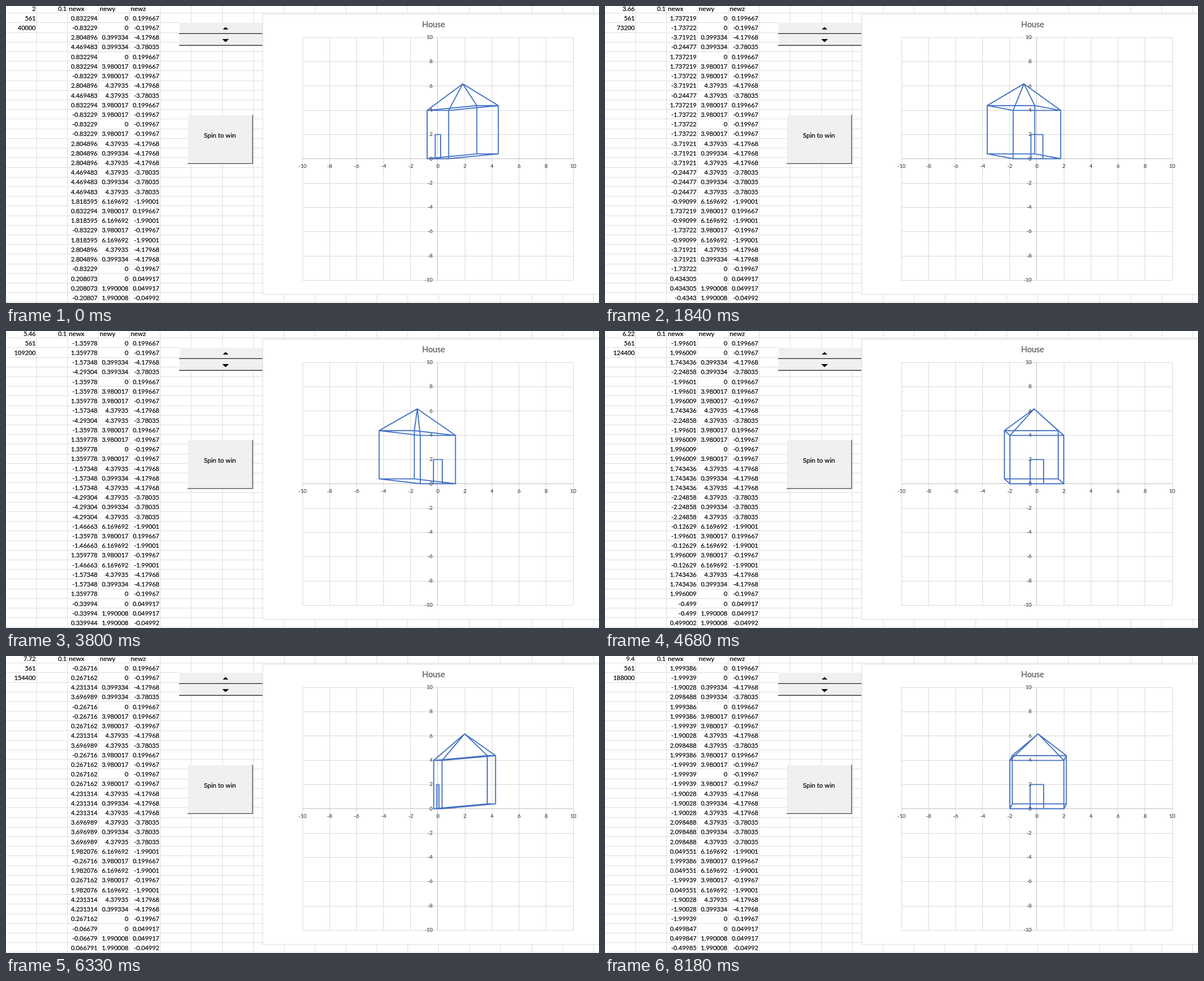
Animation of 1056x530 px, one loop 8210 ms. Source, as an HTML page with a canvas:

```html
<!DOCTYPE html>
<html lang="en">
<head>
<meta charset="utf-8">
<title>House</title>
<style>
  html, body { margin: 0; width: 100%; height: 100%; overflow: hidden; background: #fff; }
  canvas { display: block; }
</style>
</head>
<body>
<canvas id="stage" width="1056" height="530"></canvas>
<script>
const ctx = document.getElementById('stage').getContext('2d');
const W = 1056, H = 530, LOOP = 8210;
const ROW = 17.21, TILT = 0.1;

// [time in ms, angle in hundredths, optional number of steps to the next entry]
const timeline = [
  [0, 200], [790, 272, 1], [860, 278], [1060, 296], [2640, 444], [3800, 546],
  [5570, 706, 1], [5640, 712], [7030, 836], [8180, 940, 1], [LOOP, 942]
];

// House corners: floor a-d, ceiling e-h, roof tip t, door p-s
const corners = {
  a: [-2, 0, 0], b: [2, 0, 0], c: [2, 0, 4], d: [-2, 0, 4],
  e: [-2, 4, 0], f: [2, 4, 0], g: [2, 4, 4], h: [-2, 4, 4],
  t: [0, 6, 2],
  p: [-.5, 0, 0], q: [-.5, 2, 0], r: [.5, 2, 0], s: [.5, 0, 0]
};
const path = [...'abcdaefghefbfgcghdhtetftgcbpqrs'].map(k => corners[k]);

function angleAt(ms) {
  let i = 0;
  while (i < timeline.length - 2 && ms >= timeline[i + 1][0]) i++;
  const [t0, a0, fixed] = timeline[i], [t1, a1] = timeline[i + 1];
  const steps = fixed || Math.max(1, Math.round((t1 - t0) / 34));
  const part = Math.floor((ms - t0) / (t1 - t0) * steps + 1e-6) / steps;
  return 2 * Math.round((a0 + (a1 - a0) * part) / 2);
}

// The chart redraws a little later than the cells
const chartLag = ms => ms > 3200 && ms < 6300 ? 4 : 2;

function project([x, y, z], angle) {
  const s = Math.sin(TILT), c = Math.cos(TILT);
  return [
    x * Math.cos(angle) + z * Math.sin(angle),
    y * c + z * s,
    -x * s - z * c
  ];
}

function cellText(v) {
  if (Math.abs(v) < 1e-9) return '0';
  return v.toFixed(v < 0 ? 5 : 6).replace(/\.?0+$/, '');
}

const px = x => 769.1 + x * 24.1;
const py = y => 272.5 - y * 21.65;
const crisp = v => Math.floor(v) + 0.5;

function rect(x, y, w, h, color) {
  ctx.fillStyle = color;
  ctx.fillRect(x, y, w, h);
}

function line(x0, y0, x1, y1, color) {
  ctx.strokeStyle = color;
  ctx.lineWidth = 1;
  ctx.beginPath();
  ctx.moveTo(x0, y0);
  ctx.lineTo(x1, y1);
  ctx.stroke();
}

// A hairline stroke gives the text its slightly dense screen weight
function text(str, x, y, size, align, color = '#000') {
  ctx.font = `${size}px Lato, Carlito, sans-serif`;
  ctx.textAlign = align;
  ctx.fillStyle = ctx.strokeStyle = color;
  ctx.lineWidth = 0.22;
  ctx.fillText(str, x, y);
  ctx.strokeText(str, x, y);
}

function triangle(x, y, half, height) {
  ctx.fillStyle = '#000';
  ctx.beginPath();
  ctx.moveTo(x - half, y);
  ctx.lineTo(x + half, y);
  ctx.lineTo(x, y + height);
  ctx.fill();
}

function drawSheet(hundredths) {
  for (let k = 0; k <= 30; k++) {
    const y = crisp(12.65 + k * ROW);
    line(0, y, W, y, '#dedede');
  }
  for (let k = 1; k < 20; k++) {
    const x = crisp(k * 55.1 - 0.7);
    line(x, 0, x, H, '#dedede');
  }

  const base = k => Math.round(8.62 + k * ROW);
  const cell = (str, right, k) => text(str, right, base(k), 11, 'right');
  cell(String(hundredths / 100), 53, 0);
  cell('561', 53, 1);
  cell(String(hundredths * 200), 53, 2);
  cell(String(TILT), 108, 0);
  ['newx', 'newy', 'newz'].forEach((s, i) => text(s, 112 + i * 55, base(0), 11.7, 'left'));

  path.slice(0, 30).forEach((corner, i) => {
    project(corner, hundredths / 100).forEach((v, j) =>
      cell(cellText(v), 163 + j * 55, i + 1));
  });
}

// Raised grey box with a light top left and a dark bottom right edge
function bevel(x, y, w, h, dark) {
  rect(x, y, w, h, dark);
  rect(x, y, w - 1, h - 1, '#fff');
  rect(x + 1, y + 1, w - 2, h - 2, '#a0a0a0');
  rect(x + 1, y + 1, w - 3, h - 3, '#f0f0f0');
}

function drawControls() {
  bevel(308, 29, 165, 21, '#303030');
  bevel(308, 50, 165, 21, '#303030');
  triangle(391, 42, 5, -4.5);
  triangle(391, 59, 6, 5.5);

  bevel(323, 194, 117, 88, '#696969');
  text('Spin to win', 381, 235, 11.6, 'center');
}

function drawChart(angle) {
  rect(457, 13, 600, 502, '#fff');
  ctx.strokeStyle = '#d9d9d9';
  ctx.lineWidth = 1;
  ctx.strokeRect(457.5, 14.5, 620, 500);

  for (let v = -10; v <= 10; v += 2) {
    const x = crisp(px(v)), y = crisp(py(v) + 0.35);
    if (v) line(x, 56, x, 489, '#d9d9d9');
    if (v) line(528, y, 1010, y, '#d9d9d9');
  }
  line(768.5, 56, 768.5, 489, '#bfbfbf');
  line(528, 272.5, 1010, 272.5, '#bfbfbf');
  text('House', 761.5, 38, 14.4, 'center', '#595959');

  ctx.strokeStyle = '#4472c4';
  ctx.lineWidth = 1.9;
  ctx.lineJoin = ctx.lineCap = 'round';
  ctx.beginPath();
  for (const corner of path) {
    const [x, y] = project(corner, angle);
    ctx.lineTo(px(x), py(y));
  }
  ctx.stroke();

  for (let v = -10; v <= 10; v += 2) {
    text(String(v), px(v), 288.5, 9.4, 'center', '#505050');
    text(String(v), 759.8, Math.round(py(v) + 3), 9.4, 'right', '#505050');
  }
}

function draw(now) {
  const ms = now % LOOP;
  const hundredths = angleAt(ms);
  rect(0, 0, W, H, '#fff');
  drawSheet(hundredths);
  drawControls();
  drawChart((hundredths - chartLag(ms)) / 100);
}

let start = null;
function tick(now) {
  if (start === null) start = now;
  draw(now - start);
  requestAnimationFrame(tick);
}
draw(0);
requestAnimationFrame(tick);
</script>
</body>
</html>
```
